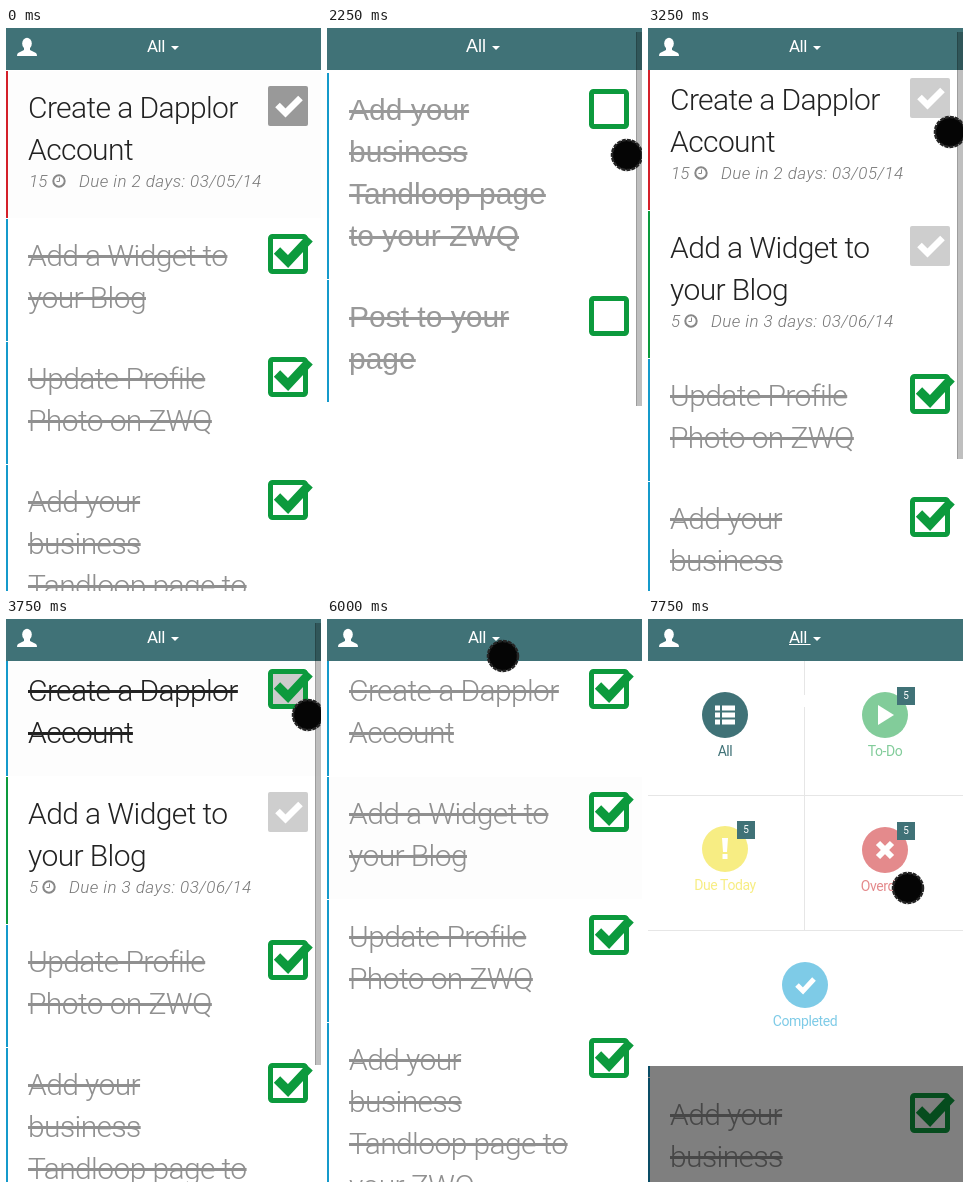
An HTML page for the animation above (8000 ms loop, 315 px wide and 563 px high).

```html
<!DOCTYPE html>
<html lang="en">
<head>
<meta charset="utf-8">
<title>Task list</title>
<style>
  html, body { margin: 0; width: 100%; height: 100%; overflow: hidden; background: #fff; }
  #stage { position: relative; width: 315px; height: 563px; overflow: hidden; background: #fff; font-family: Roboto, sans-serif; }
  #stage * { position: absolute; box-sizing: border-box; white-space: pre; }
  svg { left: 0; top: 0; width: 315px; height: 563px; overflow: visible; }
  header { left: 0; top: 0; width: 315px; height: 42px; background: #407277; color: #fff; }
  header span { left: 141px; top: 7px; font-size: 17px; line-height: 22px; letter-spacing: -.5px; }
  .task { left: 0; width: 315px; border-left: 2px solid; border-bottom: 0; }
  .title { left: 20px; top: 16px; font-size: 30px; font-weight: 300; line-height: 42px; letter-spacing: -.6px; color: #222; }
  .struck { text-decoration: line-through; text-decoration-thickness: 3px; }
  .gray { color: #909090; }
  .meta { top: 100px; font: italic 300 17px/20px Roboto, sans-serif; letter-spacing: .45px; color: #777; }
  .plain .title, .plain span { font-family: "Liberation Sans", sans-serif; letter-spacing: 0; }
  .plain .title { color: #999; }
  .plain span { left: 139px; font-size: 18px; }
  .bar { left: 309px; width: 6px; top: 4px; background: rgba(0, 0, 0, .25); border-left: 1px solid rgba(0, 0, 0, .18); }
  .shade { inset: 0; top: 42px; background: rgba(0, 0, 0, .5); }
  .menu { left: 0; top: 42px; width: 315px; height: 405px; background: #fff; }
  .label { width: 120px; text-align: center; font-size: 14px; line-height: 18px; letter-spacing: -.4px; }
  .badge { width: 18px; height: 18px; background: #407277; color: #fff; font-size: 10px; line-height: 18px; text-align: center; }
</style>
</head>
<body>
<div id="stage"></div>
<script>
const LOOP = 8000, GREEN = '#0c9a3d', BLUE = '#159acb', TEAL = '#407277';

const tasks = [
  { title: 'Create a Dapplor\nAccount', color: '#d4202a', effort: '15', due: 'Due in 2 days: 03/05/14' },
  { title: 'Add a Widget to\nyour Blog', color: GREEN, effort: '5', due: 'Due in 3 days: 03/06/14' },
  { title: 'Update Profile\nPhoto on ZWQ' },
  { title: 'Add your\nbusiness\nTandloop page to\nyour ZWQ' },
  { title: 'Post to your\npage' }
];
const plainTasks = [{ title: 'Add your\nbusiness\nTandloop page\nto your ZWQ' }, tasks[4]];

// start ms, top of list, status per task (Pressed, pending, fresh, done), pointer, scrollbar end, hovered row
const steps = [
  [0, 43, 'Pdddd', null, 0, 0],
  [500, 43, 'Pdddd', [284, 108], 0, 0],
  [750, 43, 'Pdddd', null, 0, 0],
  [2000, 43, 'Pdddd', [193, 40], 0, 0],
  [2250, 45, 'uu', [300, 127], 378],
  [2500, -107, 'ppddd', [301, 121], 431],
  [2750, 1, 'ppddd', [302, 115], 431],
  [3000, 20, 'ppddd', [302, 111], 431],
  [3250, 35, 'ppddd', [302, 104], 431],
  [3500, 35, 'ppddd', [296, 92], 0, 0],
  [3750, 35, 'fpddd', [302, 96], 446, 0],
  [4000, 35, 'dpddd', [302, 96], 446, 0],
  [4250, 35, 'dpddd', [303, 140], 447, 0],
  [4500, 35, 'dpddd', [287, 185], 447, 0],
  [4750, 35, 'dpddd', [297, 212], 0, 0],
  [5250, 35, 'dfddd', [297, 212], 464, 1],
  [5500, 35, 'ddddd', [297, 212], 464, 1],
  [5750, 35, 'ddddd', [236, 110], 464, 1],
  [6000, 35, 'ddddd', [176, 37], 0, 1],
  [6250, 90, 'ddddd', null, 0],
  [7500, 90, 'ddddd', [136, 192], 0],
  [7750, 90, 'ddddd', [260, 269], 0]
];
const MENU_START = 6250;

const svg = body => `<svg>${body}</svg>`;
const line = (points, color, width) =>
  `<polyline points="${points}" fill="none" stroke="${color}" stroke-width="${width}"/>`;

function checkbox(status) {
  if (status === 'p' || status === 'P')
    return `<rect x="260" y="15" width="40" height="40" rx="2" fill="${status === 'P' ? '#999' : '#cecece'}"/>` +
      line('269.5,34 277.5,42 292.5,27', '#fff', 6.5);
  const inside = status === 'f' ? '#ccc' : '#fff';
  const y = status === 'u' ? 18.5 : 17.5;
  return `<rect x="262.5" y="${y}" width="35" height="35" rx="2" fill="${inside}" stroke="${GREEN}" stroke-width="5"/>` +
    (status === 'u' ? '' : line('269,31.5 280,42.5 301.5,19.5', GREEN, 9));
}

function metaLine({ effort, due }) {
  const shift = effort.length > 1 ? 10 : 0;
  const clock = `<circle cx="${41 + shift}" cy="110" r="5.7" fill="none" stroke="#888" stroke-width="2"/>` +
    line(`${41.5 + shift},106.5 ${41.5 + shift},110.5 ${38.5 + shift},110.5`, '#888', 1);
  return `<div class="meta" style="left:21px;letter-spacing:0">${effort}</div>${svg(clock)}` +
    `<div class="meta" style="left:${61 + shift}px">${due}</div>`;
}

function taskList(items, top, statuses, hovered) {
  return items.map((task, i) => {
    const status = statuses[i], pending = 'pP'.includes(status);
    const height = 39 + 42 * task.title.split('\n').length + (pending ? 25 : 0);
    const look = pending ? '' : status === 'f' ? 'struck' : 'struck gray';
    const html = `<div class="task" style="top:${top}px;height:${height - 1.5}px;` +
      `border-color:${pending ? task.color : BLUE};background:${i === hovered ? '#fdfdfd' : '#fff'}">` +
      `<div class="title ${look}">${task.title}</div>${pending ? metaLine(task) : ''}${svg(checkbox(status))}</div>`;
    top += height;
    return html;
  }).join('');
}

function header(plain, open) {
  const person = '<ellipse cx="21" cy="15.5" rx="4.8" ry="5.8"/>' +
    '<path d="M18 19h6v3l6 3q1 1 1 3H11q0-2 1-3l6-3z"/>';
  return `<header><span style="${open ? 'text-decoration:underline' : ''}">All${open ? ' ' : ''}</span>` +
    svg(`<g fill="#fff">${plain ? '' : person}<path d="M165 18h8l-4 4z"/></g>`) + '</header>';
}

// icons are drawn around 0,0
const listIcon = [-7, 0, 7].map(y =>
  `<path d="M-10 ${y - 2.5}h5v5h-5zM-3 ${y - 2.5}h13v5h-13z" fill="#fff"/>`).join('');
const entries = [
  ['All', 77, 54, TEAL, listIcon],
  ['To-Do', 237, 54, '#82cc9a', '<path d="M-7-10L9 0L-7 10z" fill="#fff"/>', 5],
  ['Due Today', 77, 188, '#f7ed83', '<path d="M-3-11h6l-1 14h-4zM-2.5 5h5v5h-5z" fill="#fff"/>', 5],
  ['Overdue', 237, 189, '#e48a8c', line('-7,-7 7,7', '#fff', 6) + line('7,-7 -7,7', '#fff', 6), 5],
  ['Completed', 157, 324, '#7ecbe7', line('-8,0 -2,6 9,-6', '#fff', 5)]
];

function menu() {
  const rules = '<path d="M156.5 0V34M156.5 46V269M0 134.5H315M0 269.5H315" stroke="#e6e6e6"/>';
  const discs = entries.map(([, x, y, color, icon]) =>
    `<g transform="translate(${x} ${y})"><circle r="23" fill="${color}"/>${icon}</g>`).join('');
  const texts = entries.map(([name, x, y, color, , count]) =>
    `<div class="label" style="left:${x - 60}px;top:${y + 27}px;color:${color}">${name}</div>` +
    (count ? `<div class="badge" style="left:${x + 12}px;top:${y - 28}px">${count}</div>` : '')).join('');
  return `<div class="shade"></div><div class="menu">${svg(rules + discs)}${texts}</div>`;
}

const pointer = ([x, y]) => svg(`<circle cx="${x}" cy="${y}" r="15" fill="#050505"/>` +
  `<circle cx="${x}" cy="${y}" r="15" fill="none" stroke="#252525" stroke-width="2.5" stroke-dasharray="4 1"/>`);

const stage = document.getElementById('stage');
let shown;

function draw(now) {
  const time = now % LOOP;
  const step = steps.findLast(([start]) => start <= time);
  if (step !== shown) {
    shown = step;
    const [start, top, statuses, at, barEnd, hovered] = step;
    const plain = statuses === 'uu', open = start >= MENU_START;
    stage.className = plain ? 'plain' : '';
    stage.innerHTML = taskList(plain ? plainTasks : tasks, top, statuses, hovered) +
      (open ? menu() : '') + header(plain, open) +
      (barEnd ? `<div class="bar" style="height:${barEnd - 4}px"></div>` : '') +
      (at ? pointer(at) : '');
  }
  requestAnimationFrame(() => draw(performance.now() - origin));
}
const origin = performance.now();
draw(0);
</script>
</body>
</html>
```
